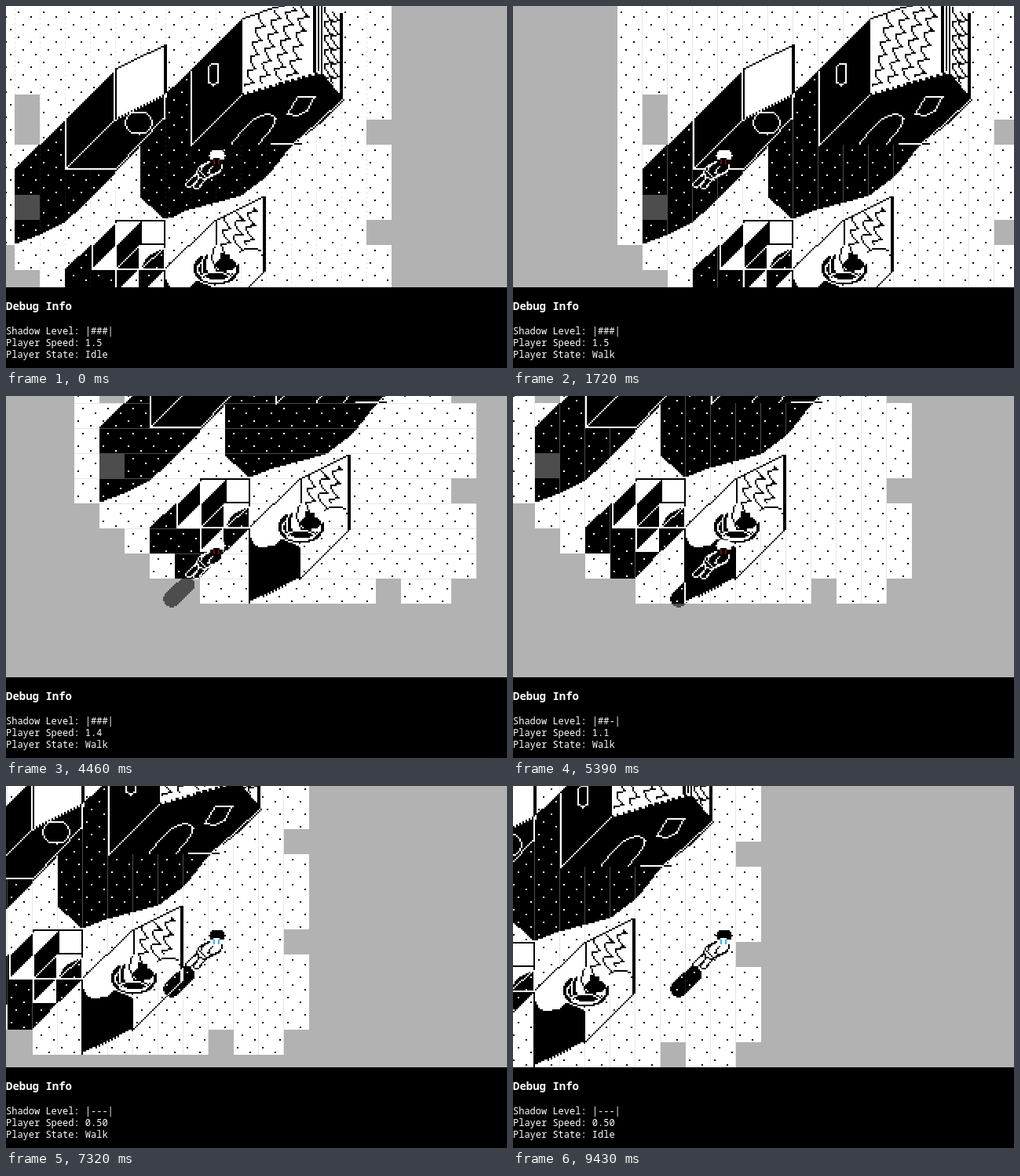
An HTML page with a canvas that plays this animation: 638 px wide and 462 px high, repeating every 9890 ms.

```html
<!DOCTYPE html>
<html lang="en">
<head>
<meta charset="utf-8">
<title>Shadow walk</title>
<style>
html, body { margin: 0; width: 638px; height: 462px; overflow: hidden; background: #000; }
canvas { position: absolute; left: 0; top: 0; }
h3, pre { position: absolute; left: 0; margin: 0; color: #fff; font-family: "Noto Sans Mono", "DejaVu Sans Mono", monospace; }
h3 { top: 373px; font-size: 14px; line-height: 20px; }
pre { top: 407px; font-size: 12px; font-weight: 500; line-height: 15px; }
</style>
</head>
<body>
<canvas id="view" width="638" height="359"></canvas>
<h3>Debug Info</h3>
<pre id="info"></pre>
<script>
const LOOP = 9890, OX = -21, OY = -15, W = 512, H = 448, TILE = 32;
const GRAY = '#b2b2b2';
const view = document.getElementById('view').getContext('2d');
const info = document.getElementById('info');

function surface(w, h) {
  const c = document.createElement('canvas');
  c.width = w;
  c.height = h;
  const g = c.getContext('2d');
  g.imageSmoothingEnabled = false;
  return g;
}

// Half-size pixel layer: hard-edged fills and one-pixel lines.
function pixelLayer(w, h, ox, oy, draw) {
  const g = surface(w / 2, h / 2);
  const local = s => (typeof s === 'string' ? s.split(' ').map(p => p.split(',').map(Number)) : s)
    .map(([x, y]) => [(x - ox) / 2, (y - oy) / 2]);
  draw({
    fill(s, color = '#fff') {
      g.fillStyle = color;
      g.beginPath();
      local(s).forEach(p => g.lineTo(...p));
      g.fill();
    },
    line(s, color = '#000', size = 1) {
      const list = local(s);
      g.fillStyle = color;
      for (let i = 1; i < list.length; i++) {
        const [a, b] = list[i - 1], [c, d] = list[i];
        const n = Math.max(1, Math.ceil(Math.max(Math.abs(c - a), Math.abs(d - b))));
        for (let k = 0; k <= n; k++) {
          g.fillRect(Math.floor(a + (c - a) * k / n), Math.floor(b + (d - b) * k / n), size, 1);
        }
      }
    }
  });
  const img = g.getImageData(0, 0, w / 2, h / 2), px = img.data;
  for (let i = 0; i < px.length; i += 4) {
    px[i + 3] = px[i + 3] > 127 ? 255 : 0;
    if (Math.abs(px[i] - px[i + 2]) < 12) px[i] = px[i + 1] = px[i + 2] = px[i] > 127 ? 255 : 0;
  }
  g.putImageData(img, 0, 0);
  return g.canvas;
}

const world = draw => pixelLayer(W, H, OX, OY, draw);

function ring(cx, cy, rx, ry = rx, from = 0, to = 2 * Math.PI) {
  return Array.from({ length: 25 }, (_, i) => {
    const a = from + (to - from) * i / 24;
    return [cx + rx * Math.cos(a), cy + ry * Math.sin(a)];
  });
}

function capsule(x0, y0, x1, y1, r) {
  const a = Math.atan2(y1 - y0, x1 - x0), q = Math.PI / 2;
  return [...ring(x1, y1, r, r, a - q, a + q), ...ring(x0, y0, r, r, a + q, a + 3 * q)];
}

// Slanted strands of scallops between two roof or curtain edges.
function scallops(p, count, x, top, height, step, rise, drift) {
  for (let k = 0; k < count; k++) {
    const list = [];
    for (let v = 0; v <= height; v += 2) {
      const u = (v / 18 + k * 0.37) % 1;
      list.push([x + k * step + drift * v / height + 13 * u * u, top - k * rise + v]);
    }
    p.line(list);
  }
}

const compartments = [[109, 306], [140, 306], [140, 336]];

const shadow = world(p => {
  p.fill('11,208 76,145 139,82 139,145 202,113 202,145 170,180 108,246 76,275 43,292 11,304');
  p.fill('299,17 299,113 400,85 430,121 408,144 362,180 335,215 300,242 230,261 202,272 172,245 172,178 202,145 202,113 236,82');
  p.fill('75,336 109,304 109,336 141,336 141,366 171,366 139,401 107,401 107,369 75,369');
  compartments.forEach(([x, y]) => p.fill([[x, y], [x + 31, y - 31], [x + 31, y], [x, y + 31]]));
  p.fill('172,336 180,320 202,308 202,336 172,367');
  p.fill('203,346 209,358 215,361 235,359 243,350 267,361 267,401 235,416 203,432');
});

const panelShadow = world(p => p.fill('266,361 290,345 300,315 329,318 329,338 266,402'));

const buildings = world(p => {
  // small house
  p.fill('76,145 139,82 202,51 202,145 140,208 76,208');
  p.line('139,82 160,70 202,51');
  p.line('201,50 201,115', '#000', 2);
  p.line('76,145 76,207 139,145 202,113');
  p.line('137,84 137,143', '#000', 2);
  p.line('76,207 140,208 202,143 202,118');
  p.line(ring(169, 149, 17, 14));

  // large house
  p.fill('236,82 299,17 335,4 391,-13 428,8 430,120 375,178 238,177');
  p.line('299,113 299,17 335,4 391,-11');
  p.line('236,84 236,177 299,113 345,100 400,85 430,120');
  scallops(p, 4, 322, 10, 92, 18, 4, -18);
  scallops(p, 2, 405, 2, 90, 9, -6, 0);
  p.line('391,-13 391,83', '#000', 2);
  p.line('397,-13 397,82');
  p.line('402,-10 402,84');
  p.line('426,10 426,116', '#000', 2);
  p.line('257,79 262,74 270,73 270,97 263,101 257,97 257,79');
  p.line('358,137 372,116 394,115 383,134 370,140 358,137');
  p.line('287,176 300,160 318,143 333,137 343,143 340,154 322,175');
  p.line('337,176 375,176');
  p.line('428,120 398,148 367,176');

  // shelves
  p.fill('109,306 139,274 202,274 202,308 141,367 139,336 109,336');
  compartments.forEach(([x, y]) => p.line([[x + 30, y - 30], [x, y], [x, y + 30], [x + 30, y + 30], [x + 30, y]]));
  compartments.forEach(([x, y]) => p.line([[x, y + 30], [x + 30, y]]));
  p.line('139,274 202,274');
  p.line('139,276 139,306');
  p.line('171,274 171,304 201,304');
  p.line('171,336 201,336');
  p.line('171,336 201,308');

  // cabinet
  p.fill('202,336 266,274 330,243 330,312 266,340 266,401 202,431');
  p.line('202,274 202,431');
  p.line('202,336 266,274 330,243');
  p.line('328,243 328,338', '#000', 2);
  p.line('330,338 266,401 235,416 202,431');
  p.line('267,274 267,321');
  scallops(p, 3, 278, 268, 46, 15, 5, -4);
  p.line(ring(312, 322, 20, 12, Math.PI, 5.3));

  // pot
  p.fill(ring(268, 335, 29, 21), '#000');
  p.fill(capsule(265, 312, 263, 334, 8));
  p.fill(capsule(292, 318, 286, 336, 6));
  p.fill(ring(280, 330, 13, 8), '#000');
  p.line(ring(268, 336, 24, 15, 0.2, 3.9), '#fff');
  p.line(ring(267, 346, 17, 6), '#fff');
  p.line(ring(258, 332, 8, 17, 1.5, 4.7), '#fff');
  p.line('265,308 262,322 268,338');
});

const holes = ['1,4', '1,5', '1,8', '15,5', '15,9', '15,13', '12,13'];
const firstColumn = r => r < 10 ? 0 : r < 13 ? r - 9 : 5;

function makeGround(mode) {
  const g = surface(W, H), dark = surface(W, H);
  for (let r = 0; r < 14; r++) for (let c = firstColumn(r); c < 16; c++) {
    if (holes.includes(c + ',' + r)) continue;
    const x = c * TILE, y = r * TILE;
    g.fillStyle = '#fff';
    g.fillRect(x, y, TILE, TILE);
    g.fillStyle = '#000';
    for (let i = 0; i < 2; i++) for (let j = 0; j < 2; j++) {
      g.fillRect(x + 10 + 16 * i - 6 * j, y + 6 + 6 * i + 16 * j, 2, 2);
    }
  }
  const seams = new Path2D();
  for (let i = 1; i < 16; i++) {
    if (mode === 'rows') seams.rect(0, i * TILE, W, 1);
    else if (mode === 'cols') seams.rect(i * TILE - 1, 0, 1, H);
    else for (let y = 0; y < H; y += 6) seams.rect(i * TILE, y, 1, 3);
  }
  g.globalCompositeOperation = 'source-atop';
  g.fillStyle = '#e6e6e6';
  g.fill(seams);
  if (mode !== 'still') {
    dark.drawImage(shadow, 0, 0, W, H);
    dark.globalCompositeOperation = 'source-in';
    dark.fillStyle = GRAY;
    dark.fill(seams);
    g.drawImage(dark.canvas, 0, 0);
  }
  return g.canvas;
}
const ground = { still: makeGround('still'), cols: makeGround('cols'), rows: makeGround('rows') };

// The walker stays put on the stage, in a 100 by 100 box at (190, 180).
const box = draw => pixelLayer(100, 100, 190, 180, draw);
const ownShadow = box(p => p.fill(capsule(230, 241, 211, 259, 10.5)));

function makeWalker(stride, lit) {
  const ink = lit ? '#000' : '#fff', skin = lit ? '#fff' : '#000', eye = lit ? '#2bb3f3' : '#661111';
  const legs = stride
    ? [[246, 215, 237, 217, 4], [250, 220, 249, 238, 4]]
    : [[246, 216, 233, 228, 4.5], [250, 220, 243, 230, 4.5]];
  const parts = [...legs, [266, 205, 252, 212, 9.5]];
  return box(p => {
    parts.forEach(([x, y, u, v, r]) => {
      p.fill(capsule(x, y, u, v, r), ink);
      p.fill(capsule(x, y, u, v, r - 2), skin);
    });
    p.line('252,203 247,211 253,216', ink);
    p.line('262,204 257,212 263,216', ink);
    p.fill(ring(269, 191, 10, 8), ink);
    p.fill(ring(268, 199, 8, 5), skin);
    [264, 270].forEach(x => p.line([[x, 197], [x, 200]], eye));
  });
}
const walkers = [0, 1].map(stride => [0, 1].map(lit => makeWalker(stride, lit)));

// Camera corners: time, x, y
const path = [[650, 0, 0], [2020, 197, 0], [3210, 197, -141], [3750, 170, -168], [4460, 108, -168],
  [5760, -19, -168], [6440, -49, -134], [7640, -125, -74], [8540, -175, -74]];

const ramp = (t, a, b) => Math.min(1, Math.max(0, (t - a) / (b - a)));

function camera(t) {
  let [, x, y] = path[0];
  for (let i = 1; i < path.length; i++) {
    const [a, u, v] = path[i - 1], [b, m, n] = path[i], k = ramp(t, a, b);
    x += (m - u) * k;
    y += (n - v) * k;
  }
  return [Math.round(x), Math.round(y)];
}

// 1 deep in shadow, 0 in the open
const shade = t => 1 - ramp(t, 2200, 2900) + ramp(t, 4140, 4500) - ramp(t, 5200, 5740);

const mask = surface(638, 359);
view.imageSmoothingEnabled = false;

function render(t) {
  const [cx, cy] = camera(t), x = OX + cx, y = OY + cy;
  const speed = 0.5 + shade(t), walking = t >= 650 && t < 8540;
  const mode = t < 650 ? 'still' : t > 3800 && t < 5000 ? 'rows' : 'cols';
  const stride = walking && t > 720 ? Math.floor((t - 720) / 163) % 2 : 0;

  view.fillStyle = GRAY;
  view.fillRect(0, 0, 638, 359);
  view.drawImage(ground[mode], x, y);
  view.drawImage(buildings, x, y, W, H);

  // Shadows invert whatever lies under them.
  mask.clearRect(0, 0, 638, 359);
  mask.drawImage(shadow, x, y, W, H);
  if (t > 5900 && t < 7000) mask.drawImage(panelShadow, x, y, W, H);
  mask.drawImage(ownShadow, 190, 180, 100, 100);
  view.globalCompositeOperation = 'difference';
  view.drawImage(mask.canvas, 0, 0);
  view.globalCompositeOperation = 'source-over';
  view.drawImage(walkers[stride][speed < 1 ? 1 : 0], 190, 180, 100, 100);

  const level = Math.round((speed - 0.5) * 3);
  const text = 'Shadow Level: |' + '#'.repeat(level) + '-'.repeat(3 - level) +
    '|\nPlayer Speed: ' + (speed < 0.55 ? '0.50' : speed.toFixed(1)) +
    '\nPlayer State: ' + (walking ? 'Walk' : 'Idle');
  if (info.textContent !== text) info.textContent = text;
}

const start = performance.now();
function tick(now) {
  render(Math.max(0, now - start) % LOOP);
  requestAnimationFrame(tick);
}
render(0);
requestAnimationFrame(tick);
</script>
</body>
</html>
```
